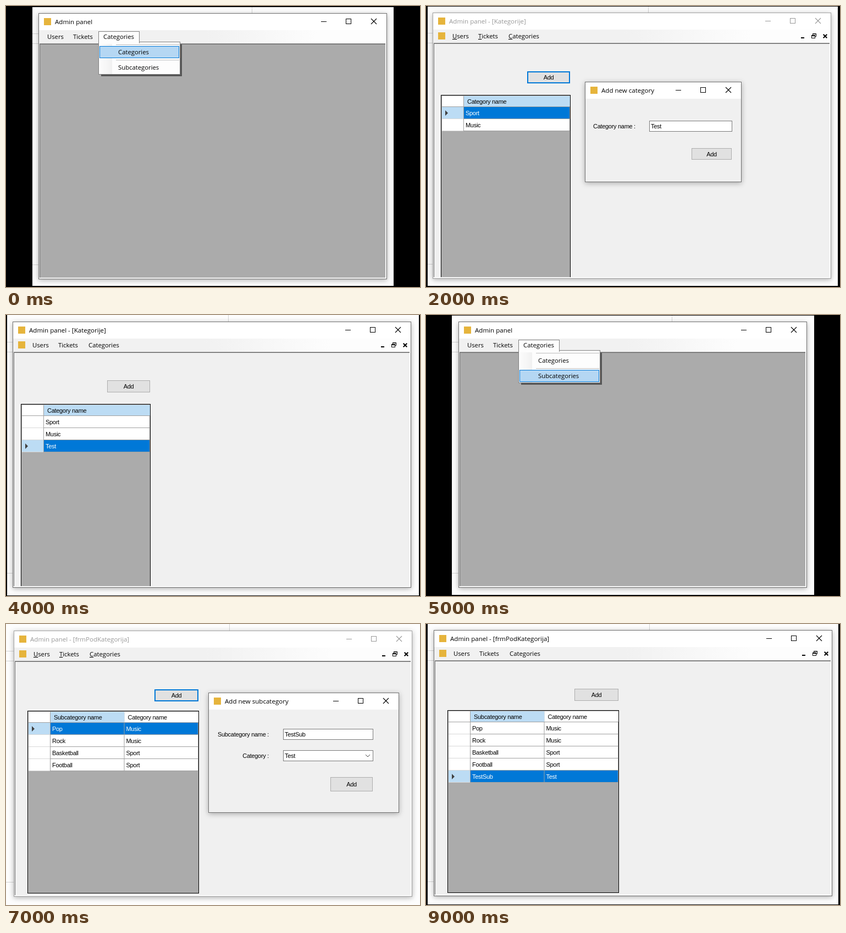
An HTML page for the animation above (10 s loop, 753x512 px).

```html
<!DOCTYPE html>
<html lang="en">
<head>
<meta charset="utf-8">
<title>Admin panel</title>
<style>
  html, body { margin: 0; width: 100%; height: 100%; overflow: hidden; background: #000; }
  svg { position: absolute; left: 0; top: 0; display: block; }
  .scene { visibility: hidden; animation: turn 10s step-end infinite; }
  @keyframes turn {
    0% { visibility: visible; }
    10%, 100% { visibility: hidden; }
  }
  text { white-space: pre; }
  .title { font: 11.55px "Open Sans", "Noto Sans", sans-serif; }
  .menu { font: 11.3px "Open Sans", "Noto Sans", sans-serif; }
  .msg { font: 11px "Open Sans", "Noto Sans", sans-serif; }
  .form { font: 11px "Liberation Sans", Arial, sans-serif; letter-spacing: -.3px; }
  .key { text-decoration: underline; }
  .shadow { filter: drop-shadow(0 2px 5px rgba(0, 0, 0, .3)); }
</style>
</head>
<body>
<svg id="stage" width="753" height="512" viewBox="0 0 753 512">
  <defs>
    <linearGradient id="strip">
      <stop offset=".48" stop-color="#f1f1f1"/>
      <stop offset=".8" stop-color="#fdfdfd"/>
    </linearGradient>
    <linearGradient id="gutter">
      <stop offset="0" stop-color="#fcfcfc"/>
      <stop offset="1" stop-color="#f1f1f1"/>
    </linearGradient>
  </defs>
</svg>
<script>
const BLUE = '#0078d7', PALE = '#bcdcf4', FACE = '#f0f0f0', GREY = '#ababab', LINE = '#a0a0a0';

const rect = (x, y, w, h, fill, extra = '') =>
  `<rect x="${x}" y="${y}" width="${w}" height="${h}" fill="${fill}" ${extra}/>`;
const box = (x, y, w, h, fill, stroke, weight = 1, extra = '') =>
  rect(x + weight / 2, y + weight / 2, w - weight, h - weight, fill,
    `stroke="${stroke}" stroke-width="${weight}" ${extra}`);
const path = (d, stroke = '#000', weight = 1) =>
  `<path d="${d}" fill="none" stroke="${stroke}" stroke-width="${weight}"/>`;
// y is the vertical middle of the line of text
const label = (x, y, str, kind = 'form', fill = '#000', anchor = 'start') =>
  `<text class="${kind}" x="${x}" y="${y + 4}" fill="${fill}" text-anchor="${anchor}">${str}</text>`;
const at = (x, y, ...parts) => `<g transform="translate(${x} ${y})">${parts.join('')}</g>`;
const icon = (x, y) => rect(x, y, 13, 13, '#e6b43c');
const cross = (x, y, r, color, weight) =>
  path(`M${x - r} ${y - r}l${2 * r} ${2 * r}m0 ${-2 * r}l${-2 * r} ${2 * r}`, color, weight);

function button(x, y, w, h, str, focused = true, kind = 'form') {
  return box(x, y, w, h, '#e1e1e1', focused ? BLUE : '#adadad', focused ? 2 : 1) +
    label(x + w / 2, y + h / 2, str, kind, '#000', 'middle');
}

function frame(w, h, title, active) {
  const ink = active ? '#000' : '#999';
  return box(0, 0, w, h, FACE, active ? '#707070' : '#a2a2a2', 1, 'class="shadow"') +
    rect(1, 1, w - 2, 30, '#fff') + icon(10, 9) + label(30, 16, title, 'title', ink) +
    path(`M${w - 120} 15.5h10`, ink) + box(w - 75, 10, 10, 10, 'none', ink) +
    cross(w - 24, 15, 5, ink, 1.1);
}

function mainWindow(w, { title, active = true, child = true, keys = false }) {
  const shift = child ? 20 : 0;
  const words = [['Users', 16], ['Tickets', 63], ['Categories', 118]].map(([s, x]) =>
    label(x + shift, 43, keys ? `<tspan class="key">${s[0]}</tspan>${s.slice(1)}` : s, 'menu'));
  const childControls = icon(10, 36) +
    rect(w - 55, 45, 6, 2, '#000') +
    path(`M${w - 33.5} 41v-2.5h6v5h-2.5M${w - 34} 39h7`) +
    box(w - 36, 41, 7, 6, '#fff', '#000') + rect(w - 36, 41, 7, 2, '#000') +
    cross(w - 11, 43, 3.3, '#000', 2);
  return frame(w, 485, title, active) +
    rect(1, 31, w - 2, 25, 'url(#strip)') + words.join('') + (child ? childControls : '') +
    rect(2, 55, w - 4, 428, '#fff') + rect(2, 55, w - 5, 427, LINE) +
    rect(2, 56, w - 5, 426, '#696969') + rect(3, 57, w - 6, 425, child ? FACE : GREY);
}

function dropdown(chosen) {
  const items = ['Categories', 'Subcategories'].map((s, i) =>
    rect(141, 57 + i * 28, 115, 1, '#bdbdbd') +
    (i === chosen ? box(111, 60 + i * 28, 145, 22, '#b5d7f3', BLUE) : '') +
    label(145, 71 + i * 28, s, 'menu'));
  return rect(114, 57, 147, 58, '#000', 'opacity=".5"') +
    box(109, 52, 149, 60, '#fdfdfd', '#808080') + rect(110, 54, 24, 57, 'url(#gutter)') +
    box(109, 33, 75, 22, '#fdfdfd', '#808080') + rect(110, 52, 73, 4, '#fdfdfd') +
    label(118, 43, 'Categories', 'menu') + items.join('');
}

function grid(x, y, w, h, heads, colWidth, rows, current, open) {
  const left = 42, width = heads.length * colWidth;
  let out = box(0, 0, w, h, GREY, '#000') + rect(2, 2, left - 1, 20, '#fff');
  if (open) out += rect(1, h - 1, w - 2, 1, GREY);
  heads.forEach((head, c) => {
    out += rect(left + c * colWidth, 2, colWidth, 20, c ? '#fff' : PALE) +
      label(left + 6 + c * colWidth, 12, head);
  });
  out += rect(2, 21, left + width - 2, 1, LINE);
  rows.forEach((row, r) => {
    const top = 22 + r * 22, on = r === current;
    out += rect(2, top, left - 2, 21, on ? PALE : '#fff') + rect(2, top + 21, left - 2, 1, '#d8d8d8') +
      rect(left, top, width, 21, on ? BLUE : '#fff') + rect(left, top + 21, width, 1, LINE);
    if (on) out += `<path d="M8 ${top + 6}l5 5l-5 5z" fill="#404040"/>`;
    row.forEach((cell, c) => {
      out += label(left + 3 + c * colWidth, top + 11, cell, 'form', on ? '#fff' : '#000') +
        rect(left + (c + 1) * colWidth - 1, top, 1, 22, LINE);
    });
  });
  out += rect(left - 1, 2, 1, 20 + rows.length * 22, LINE);
  return at(x, y, out);
}

const field = (x, y, w, str) => box(x, y, w, 20, '#fff', '#7a7a7a') + label(x + 3, y + 10, str);

const message = (x, y) => at(x, y,
  box(0, 0, 145, 133, '#fff', '#606060', 1, 'class="shadow"'),
  rect(1, 90, 143, 42, FACE), cross(129, 15, 5, '#000', 1.1),
  label(12, 61, 'Successfully added', 'msg'), button(55, 100, 73, 21, 'OK', true, 'msg'));

const categoryDialog = done => at(277, 126,
  frame(285, 183, 'Add new category', !done),
  label(15, 81, 'Category name :'), field(117, 71, 151, 'Test'),
  button(194, 121, 73, 21, 'Add', done)) + (done ? message(316, 231) : '');

const subcategoryDialog = done => at(354, 113,
  frame(347, 219, 'Add new subcategory', !done),
  label(110, 76, 'Subcategory name :', 'form', '#000', 'end'), field(136, 66, 164, 'TestSub'),
  label(110, 115, 'Category :', 'form', '#000', 'end'), field(136, 105, 164, 'Test'),
  path('M286 113l4 4l4 -4', '#444'),
  button(222, 154, 77, 26, 'Add', done)) + (done ? message(362, 256) : '');

const categories = ['Sport', 'Music', 'Test'].map(s => [s]);
const subcategories = [['Pop', 'Music'], ['Rock', 'Music'], ['Basketball', 'Sport'],
  ['Football', 'Sport'], ['TestSub', 'Test']];

const menuView = chosen =>
  mainWindow(634, { title: 'Admin panel', child: false }) + dropdown(chosen);

function categoryView(added, dialog = '') {
  return mainWindow(725, { title: 'Admin panel - [Kategorije]', active: !dialog, keys: !!dialog }) +
    button(172, 107, 78, 22, 'Add', !added) +
    grid(15, 150, 236, 332, ['Category name'], 193, categories.slice(0, added ? 3 : 2),
      added ? 2 : 0, true) + dialog;
}

function subcategoryView(added, dialog = '') {
  return mainWindow(725, { title: 'Admin panel - [frmPodKategorija]', active: !dialog, keys: !!dialog }) +
    button(256, 107, 80, 22, 'Add', !added) +
    grid(25, 146, 312, 333, ['Subcategory name', 'Category name'], 134.5,
      subcategories.slice(0, added ? 5 : 4), added ? 4 : 0) + dialog;
}

// each scene: backdrop edges [left, top, right, bottom], window corner, content
const scenes = [
  [[48, 2, 705, 510], [59, 13], menuView(0)],
  [[2, 1, 751, 510], [12, 13], categoryView(false)],
  [[3, 1, 749, 510], [12, 12], categoryView(false, categoryDialog(false))],
  [[3, 0, 749, 512], [12, 11], categoryView(false, categoryDialog(true))],
  [[2, 0, 751, 511], [12, 12], categoryView(true)],
  [[47, 1, 706, 510], [59, 12], menuView(1)],
  [[4, 1, 748, 510], [14, 12], subcategoryView(false)],
  [[0, 0, 753, 512], [14, 12], subcategoryView(false, subcategoryDialog(false))],
  [[4, 1, 748, 510], [13, 10], subcategoryView(false, subcategoryDialog(true))],
  [[3, 0, 750, 511], [14, 11], subcategoryView(true)]
];

function backdrop([l, t, r, b], [x, y]) {
  const ruled = [37, 55, 458].map(dy => rect(l, y + dy, x - l, 1, '#d4d4d4')).join('');
  return rect(l, t, r - l, b - t, '#fdfdfd') + ruled +
    rect(x + (x > 50 ? 388 : 392), t, 1, y - t, '#d4d4d4');
}

document.getElementById('stage').insertAdjacentHTML('beforeend', scenes.map(([edges, corner, view], i) =>
  `<g class="scene" style="animation-delay:${i ? i - scenes.length : 0}s">` +
  rect(0, 0, 753, 512, '#000') + backdrop(edges, corner) + at(...corner, view) + '</g>').join(''));
</script>
</body>
</html>
```
